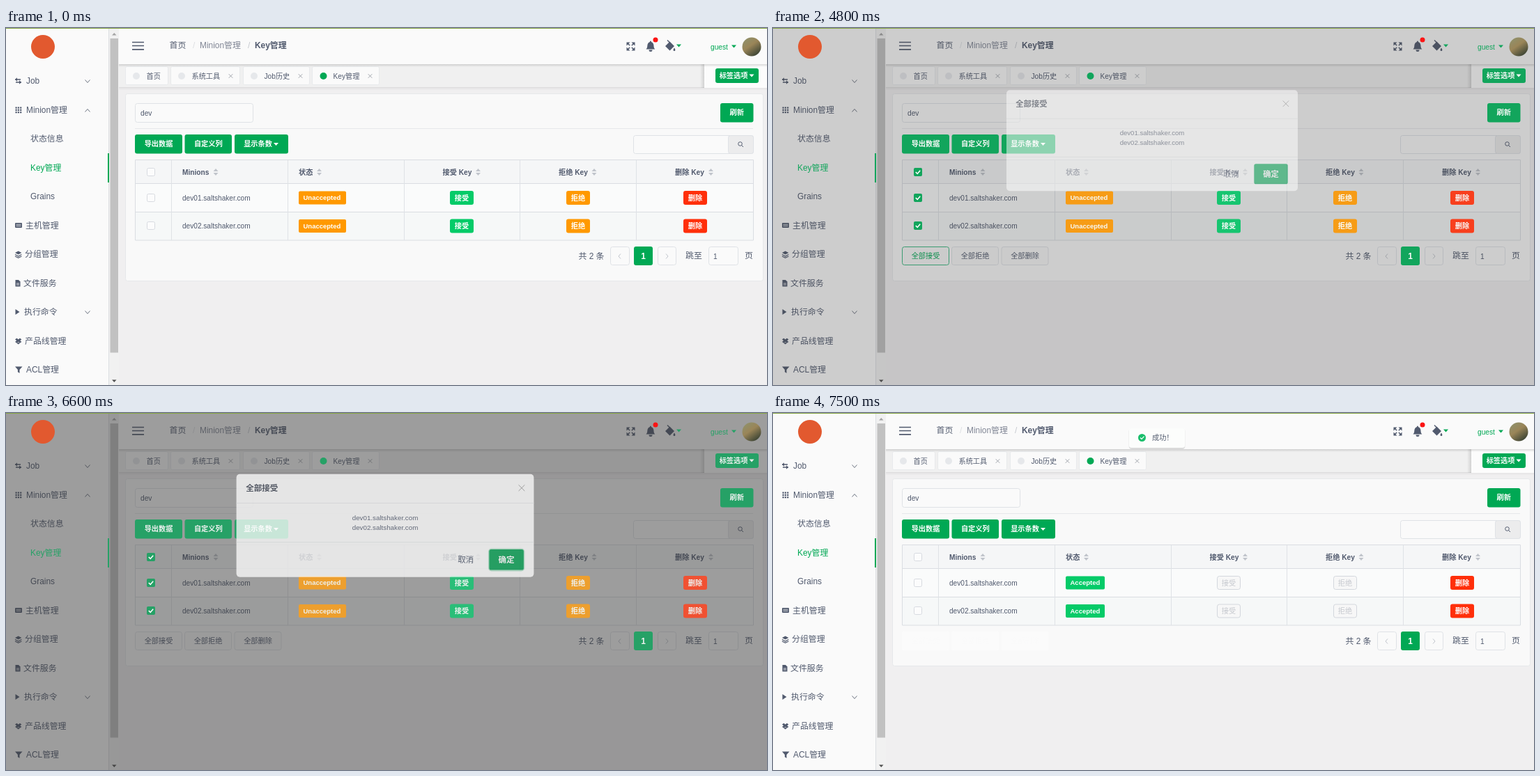
An HTML page for the animation above (8000 ms loop, 1092 by 513 pixels).

```html
<!DOCTYPE html>
<html lang="zh">
<head>
<meta charset="utf-8">
<title>Key管理</title>
<style>
html, body { margin: 0; width: 100%; height: 100%; overflow: hidden; background: #f0eff0; }
svg { display: block; width: 1092px; height: 513px; }
text { font-family: "Liberation Sans", "Noto Sans CJK SC", "Noto Sans CJK", sans-serif; white-space: pre; }
</style>
</head>
<body>
<svg id="stage" viewBox="0 0 1092 513" xmlns="http://www.w3.org/2000/svg"></svg>
<script>
const LOOP = 8000, BIG = 11.9, SMALL = 10.2;
const INK = '#515a6e', LINE = '#dfe2e6', GREEN = '#00a854';
const stage = document.getElementById('stage');

// Markup helpers
const rect = (x, y, w, h, fill, extra = '') =>
  `<rect x="${x}" y="${y}" width="${w}" height="${h}" fill="${fill}" ${extra}/>`;
const box = (x, y, w, h, fill, stroke = LINE, r = 3, extra = '') =>
  rect(x + .5, y + .5, w - 1, h - 1, fill, `stroke="${stroke}" rx="${r}" ${extra}`);
const path = (d, color = INK, width = 1, fill = 'none') =>
  `<path d="${d}" fill="${fill}" stroke="${color}" stroke-width="${width}"/>`;
const shape = (d, fill = INK) => `<path d="${d}" fill="${fill}"/>`;
const dot = (x, y, r, fill) => `<circle cx="${x}" cy="${y}" r="${r}" fill="${fill}"/>`;
const text = (x, cy, s, size = BIG, fill = INK, extra = '') =>
  `<text x="${x}" y="${cy + size * .36}" font-size="${size}" fill="${fill}" ${extra}>${s}</text>`;
const bold = 'font-weight="700"', mid = 'text-anchor="middle"';
const group = (id, body, extra = '') => `<g id="${id}" ${extra}>${body}</g>`;
const cross = (x, y, r, c = '#a3a7ae', w = 1) =>
  path(`M${x - r} ${y - r}l${2 * r} ${2 * r}m0 ${-2 * r}l${-2 * r} ${2 * r}`, c, w);
const caret = (x, y, c) => shape(`M${x - 3.5} ${y - 2}h7l-3.5 4z`, c);
const chevron = (x, y, up) => path(`M${x - 3.5} ${y + 2 * up}l3.5 ${-4 * up}l3.5 ${4 * up}`, '#6b7280');
const button = (x, y, w, h, fill, label, size = SMALL, dx = 0) =>
  rect(x, y, w, h, fill, 'rx="3"') +
  text(x + w / 2 + dx, y + h / 2, label, size, 'var(--w)', `${bold} ${mid}`);

const rows = [[244, 'dev01.saltshaker.com'], [284.5, 'dev02.saltshaker.com']];
const checkY = [207, 244, 284];

function sidebar() {
  const items = [[29, 76, 'Job'], [29, 118, 'Minion管理'], [35, 159, '状态信息'], [35, 242, 'Grains'],
    [28, 284, '主机管理'], [27, 325, '分组管理'], [25, 367, '文件服务'], [26, 408, '执行命令'],
    [27, 450, '产品线管理'], [29, 491, 'ACL管理']];
  let grid = '';
  for (let i = 0; i < 9; i++) grid += rect(13.5 + i % 3 * 3.3, 113.5 + Math.floor(i / 3) * 3.3, 2.2, 2.2, INK);
  return rect(0, 0, 148, 513, '#fafafa') + rect(147, 0, 1, 513, '#dcdee2') +
    items.map(i => text(...i)).join('') + grid +
    chevron(117, 76.5, -1) + chevron(117, 118.5, 1) + chevron(117, 408.5, -1) +
    path('M13 74h8M14 78h8', INK, 1.4) + shape('M13 74l3-2.8v5.6zM22 78l-3-2.8v5.6z') +
    rect(13, 280, 10, 7, INK, 'rx="1"') + path('M14.5 282.3h7M14.5 284.5h7', '#fafafa', .8) +
    shape('M13 323l4.7-2.6l4.7 2.6l-4.7 2.6z') + path('M13 325.5l4.7 2.5l4.7-2.5M13 328l4.7 2.3l4.7-2.3', INK, 1.2) +
    shape('M13.5 362h4.5l2.5 2.5v7h-7z') + path('M15 367h4M15 369h4', '#fafafa', .8) +
    shape('M13.5 404l6 4l-6 4z') +
    shape('M13 447.5l2.5-1.7l2.2 1.7l2.2-1.7l2.5 1.7l-2.2 1.8l2.2 1.8l-2.5 1.6l-2.2-1.7l-2.2 1.7l-2.5-1.6l2.2-1.8zM15.4 453l2.3-1.2l2.3 1.2l-2.3 1.5z') +
    shape('M13 486.5h10.5l-4 4.5v5l-2.6-1.8v-3.2z') +
    rect(148, 0, 14, 513, '#f1f1f1') + rect(149.5, 15, 11.5, 451.5, '#c1c1c1') +
    shape('M152 10.5h6.5l-3.2-3.5z', '#a3a3a3') + shape('M152 505.5h6.5l-3.2 3.5z', '#505050');
}

function topbar() {
  const tabs = [[171, 62, '首页'], [236, 100, '系统工具'], [340, 96, 'Job历史'], [439, 97, 'Key管理']];
  return rect(162, 52, 930, 34, '#f0f0f0') + rect(162, 85, 930, 1.5, '#dcdcdd') +
    rect(162, 86.5, 930, 2, '#e9e8e9') +
    tabs.map(([x, w, s], i) => box(x, 55, w, 27, '#fafafa', '#e8eaec', 2) +
      (i < 3 ? dot(x + 16, 69, 5, '#e6e8eb') : '') + text(x + 30.5, 69, s, SMALL) +
      (i ? cross(x + w - 13.5, 69, 2.8) : '')).join('') +
    rect(996, 52, 6, 34, 'url(#side)') + rect(1002, 52, 90, 34, '#fcfcfc') +
    rect(162, 1, 930, 51, '#fafafa') + rect(162, 52, 930, 4, 'url(#under)') +
    path('M181 20.5h17M181 25.5h17M181 30.8h17', INK, 1.7) +
    text(234.5, 25, '首页') + text(268, 25, '/', BIG, '#dcdee2') + text(278, 25, 'Minion管理', BIG, '#808695') +
    text(347, 25, '/', BIG, '#c5c8ce') + text(357, 25, 'Key管理', BIG, INK, bold) +
    shape('M890.5 20.5h5l-5 5zM902.5 20.5v5l-5-5zM890.5 32.5v-5l5 5zM902.5 32.5h-5l5-5z') +
    path('M892 22l9 9M901 22l-9 9', INK, 1.5) + rect(894.8, 24.8, 3.4, 3.4, '#fafafa') +
    shape('M918.5 30.5c2-2 1.6-4 2-6.500c.5-2.500 2-3.500 3.500-4v-1.200h1.800v1.200c1.600.5 3 1.500 3.500 4c.4 2.500 0 4.500 2 6.500zM922.500 31.500h5a2.500 2.500 0 0 1-5 0z') +
    shape('M946 26l6.500-6.500l6.500 6.500l-6.500 6.500zM959 28.500c2.200 3 1.500 4.500 0 4.500s-2.200-1.500 0-4.500z') +
    path('M949 17.500l4 4', INK, 1.400);
}

function panel() {
  const cols = [237, 404, 571, 737, 904];
  const heads = [[253, 'Minions', 301], [420, '状态', 449.5], [626.5, '接受 Key', 677.5],
    [793, '拒绝 Key', 844], [960, '删除 Key', 1011.5]];
  return box(171, 94, 916, 270, '#f9f9f9', '#e6e8ea') +
    box(185, 108, 170, 28, '#fafafa') + text(193, 122, 'dev', SMALL) + rect(185, 144, 887, 1, '#e6e8ea') +
    box(900, 154, 173, 27, '#fafafa') + box(1036, 154, 37, 27, '#ececed') +
    `<circle cx="1053.500" cy="166.500" r="2.800" fill="none" stroke="${INK}"/>` + path('M1055.5 168.500l2.500 2.500') +
    rect(185, 190, 887, 34, '#f5f6f7') + rect(185, 224, 887, 40, '#fafbfb') + rect(185, 264, 887, 41, '#f6f8f8') +
    path('M185.500 189.500H1072.500V305H185.500zM185 223.500H1072M185 264.500H1072', '#dadde2') +
    cols.map(x => rect(x, 190, 1, 115, '#dfe2e6')).join('') +
    heads.map(([x, s, c]) => text(x, 207, s, SMALL, INK, bold) +
      shape(`M${c - 3.5} 206h7l-3.500-4zM${c - 3.5} 208h7l-3.500 4z`, '#c0c4cb')).join('') +
    rows.map(([y, s]) => text(253, y, s, 10.1)).join('') +
    checkY.map((y, i) => box(202, y - 6, 12, 12, '#fcfcfc', '#d7dae0', 2, i ? '' : 'id="headBox"')).join('') +
    text(821.5, 328, '共 2 条') + text(975, 327, '跳至') + text(1060, 327, '页') +
    box(867, 314, 28, 27, '#fafafa') + box(935, 314, 27, 27, '#fafafa') + box(1008, 314, 43, 27, '#fafafa') +
    path('M882 324.500l-3 3.500l3 3.500M947 324.500l3 3.500l-3 3.500', '#c0c4cb') + text(1015, 328, '1', SMALL) +
    group('batch', ['全部接受', '全部拒绝', '全部删除'].map((s, i) => {
      const x = [185, 256, 327.500][i];
      return box(x, 314, 68, 27, '#f7f7f7', LINE, 3, `id="edge${i}"`) +
        text(x + 34, 327.500, s, SMALL, INK, `${mid} id="label${i}"`);
    }).join('')) +
    group('ghost', [185, 256, 327.500].map(x => rect(x, 314, 68, 27, '#fdfdfd', 'rx="3"')).join('')) +
    group('ring', box(184.5, 313.500, 69, 28, 'none', '#8fb0dc'));
}

// Coloured parts, which the mask dims less than the rest
function chips() {
  const g = 'var(--g)', a = 'var(--a)', o = 'var(--o)', r = 'var(--r)';
  const off = (x, y, s) => box(x, y - 10, 34, 20, '#f7f7f7', '#d3d7dd') + text(x + 17, y, s, SMALL, '#c5c8ce', mid);
  const tag = (y, w, c, s) => rect(420, y - 9.5, w, 19, c, 'rx="2"') + text(426.5, y, s, 9.5, 'var(--w)', bold);
  return dot(53, 27, 17, '#e2592f') + text(35, 201, 'Key管理', BIG, g) + rect(146, 180, 2, 42, g) +
    dot(455.5, 69, 5, g) + dot(932, 17, 3.5, '#fb1414') + caret(965.5, 25.5, g) +
    text(1011, 27, 'guest', SMALL, g) + caret(1044.500, 26.5, g) + dot(1070, 27, 13.5, 'url(#photo)') +
    button(1018, 58, 62, 21, g, '标签选项', SMALL, -5) + caret(1070, 68.500, 'var(--w)') +
    button(1025, 108, 47.500, 27.500, g, '刷新') + button(185, 153, 68, 27.500, g, '导出数据') +
    button(256.5, 153, 67.500, 27.500, g, '自定义列') + button(328, 153, 77, 27.500, g, '显示条数', SMALL, -5) +
    caret(387.500, 167, 'var(--w)') + button(901, 314, 27, 27, g, '1', BIG) +
    rows.map(([y]) => button(972, y - 10, 34, 20, r, '删除')).join('') +
    group('pending', rows.map(([y]) => tag(y, 68, o, 'Unaccepted') +
      button(637, y - 10, 34, 20, a, '接受') + button(804, y - 10, 34, 20, o, '拒绝')).join('')) +
    group('done', rows.map(([y]) => tag(y, 56, a, 'Accepted') +
      off(637, y, '接受') + off(804, y, '拒绝')).join('')) +
    group('halo', rect(200.5, 199.500, 15, 15, '#bfe0d0', 'rx="3"')) +
    group('checks', checkY.map(y => rect(202, y - 6, 12, 12, g, 'rx="2"') +
      path(`M204.800 ${y}l2.400 2.400l4-4.600`, '#fff', 1.600)).join(''));
}

function modal() {
  return rect(324, 85.5, 440, 152.500, '#fefefe', 'rx="5"') + text(338, 106, '全部接受', BIG, '#3c4352', bold) +
    cross(746, 106, 4.500, '#999') + rect(324, 128, 440, 1, '#e8eaec') + rect(324, 186, 440, 1, '#e8eaec') +
    rows.map(([, s], i) => text(544, 150 + 15 * i, s, 10.1, INK, mid)).join('') +
    text(651.5, 212, '取消', BIG, INK, 'id="cancel"') +
    group('okRing', rect(696.5, 195.500, 54, 34, '#b5e3cc', 'rx="5"')) +
    rect(698, 197, 51, 30.500, GREEN, 'rx="3" id="ok"') + text(723.5, 212, '确定', BIG, '#fff', `${bold} ${mid}`);
}

const toast = rect(511, 24, 80, 28, '#000', 'rx="4" opacity=".08"') +
  rect(510.500, 22.500, 81, 29, '#000', 'rx="4" opacity=".07"') + rect(511, 22, 80, 28, '#fcfdfc', 'rx="3"') +
  dot(529.500, 35.500, 5.500, '#19be6b') + path('M527 35.500l2 2l3.500-3.800', '#fff', 1.200) + text(544, 35.500, '成功！', SMALL);

stage.innerHTML = `<defs>
  <linearGradient id="under" x2="0" y2="1"><stop stop-color="#000" stop-opacity=".14"/><stop offset="1" stop-color="#000" stop-opacity="0"/></linearGradient>
  <linearGradient id="side"><stop stop-color="#000" stop-opacity="0"/><stop offset="1" stop-color="#000" stop-opacity=".13"/></linearGradient>
  <linearGradient id="photo" x2=".7" y2="1"><stop stop-color="#8d9470"/><stop offset=".5" stop-color="#9a8558"/><stop offset="1" stop-color="#3c4434"/></linearGradient>
</defs>` + rect(0, 0, 1092, 513, '#f0eff0') + topbar() + panel() + sidebar() +
  group('mask', rect(0, 0, 1092, 513, '#373737')) + group('chips', chips()) +
  rect(0, 0, 1092, 1, '#86a544') + group('modal', modal()) + group('toast', toast);

const el = {};
stage.querySelectorAll('[id]').forEach(n => el[n.id] = n);
const set = (id, key, v) => el[id].setAttribute(key, v);
const fade = (id, v) => set(id, 'opacity', v);

// Piecewise linear track: time, value, time, value, ...
function track(t, ...p) {
  if (t <= p[0]) return p[1];
  for (let i = 2; i < p.length; i += 2)
    if (t <= p[i]) return p[i - 1] + (p[i + 1] - p[i - 1]) * (t - p[i - 2]) / (p[i] - p[i - 2]);
  return p[p.length - 1];
}
function mix(a, b, k) {
  const part = (c, i) => parseInt(c.slice(i, i + 2), 16);
  return `rgb(${[1, 3, 5].map(i => Math.round(part(a, i) + (part(b, i) - part(a, i)) * k))})`;
}
const tints = { g: [GREEN, '#2f9f6a'], a: ['#05cb68', '#33bb7c'], o: ['#ff9900', '#e8a13a'],
  r: ['#ff2f0a', '#ec5a3c'], w: ['#ffffff', '#e9eeeb'] };

function draw(now) {
  const t = Math.floor(now % LOOP / 100) * 100;
  const dim = track(t, 4700, 0, 4800, .38, 4900, .8, 5000, 1, 6500, 1, 6600, .8, 6700, .4, 6800, .12, 6900, 0);
  const show = track(t, 4700, 0, 4800, .52, 4900, .88, 5000, 1, 6500, 1, 6600, .75, 6700, .25, 6800, 0);
  const size = track(t, 4700, .9, 4800, .95, 4900, .985, 5000, 1, 6500, 1, 6600, .97, 6700, .916);
  fade('mask', dim * .6);
  fade('modal', show);
  set('modal', 'transform', `translate(544 162) scale(${size}) translate(-544 -162)`);
  for (const k in tints) stage.style.setProperty('--' + k, mix(...tints[k], dim));

  // Selection
  set('headBox', 'stroke', t >= 1900 && t < 7100 ? '#b4b8bf' : '#d7dae0');
  fade('checks', track(t, 2100, 0, 2300, 1, 7100, 1, 7300, 0));
  fade('halo', track(t, 2100, 0, 2300, 1, 4200, 1, 4500, 0));
  fade('batch', track(t, 2100, 0, 2500, 1, 7100, 1, 7500, .02));
  fade('ghost', t >= 7500 ? .7 : 0);
  const hover = [track(t, 4200, 0, 4500, 1, 4800, 1, 5000, 0),
    track(t, 2800, 0, 3100, 1, 3400, 1, 3500, .5, 3600, 1, 4200, 1, 4500, 0), 0];
  hover.forEach((h, i) => {
    set('edge' + i, 'stroke', mix(LINE, '#3db983', h));
    set('label' + i, 'fill', mix(INK, GREEN, h));
  });
  fade('ring', track(t, 4800, 0, 5000, .6, 6300, .6, 6400, 0));

  // Dialog buttons
  set('cancel', 'fill', mix(INK, '#33b976', track(t, 5400, 0, 5600, 1, 5700, 1, 5900, 0)));
  set('ok', 'fill', t >= 6400 ? '#00a050' : mix(GREEN, '#1fb268', track(t, 5600, 0, 5900, 1)));
  fade('okRing', t >= 6400 ? 1 : 0);

  // Outcome
  fade('pending', t < 7200 ? 1 : 0);
  fade('done', t < 7200 ? 0 : 1);
  const drop = track(t, 7000, 0, 7100, .25, 7200, .6, 7300, .88, 7400, 1);
  fade('toast', drop);
  set('toast', 'transform', `translate(0 ${(drop - 1) * 28})`);
}

const start = performance.now();
function tick() {
  draw(performance.now() - start);
  requestAnimationFrame(tick);
}
tick();
</script>
</body>
</html>
```
